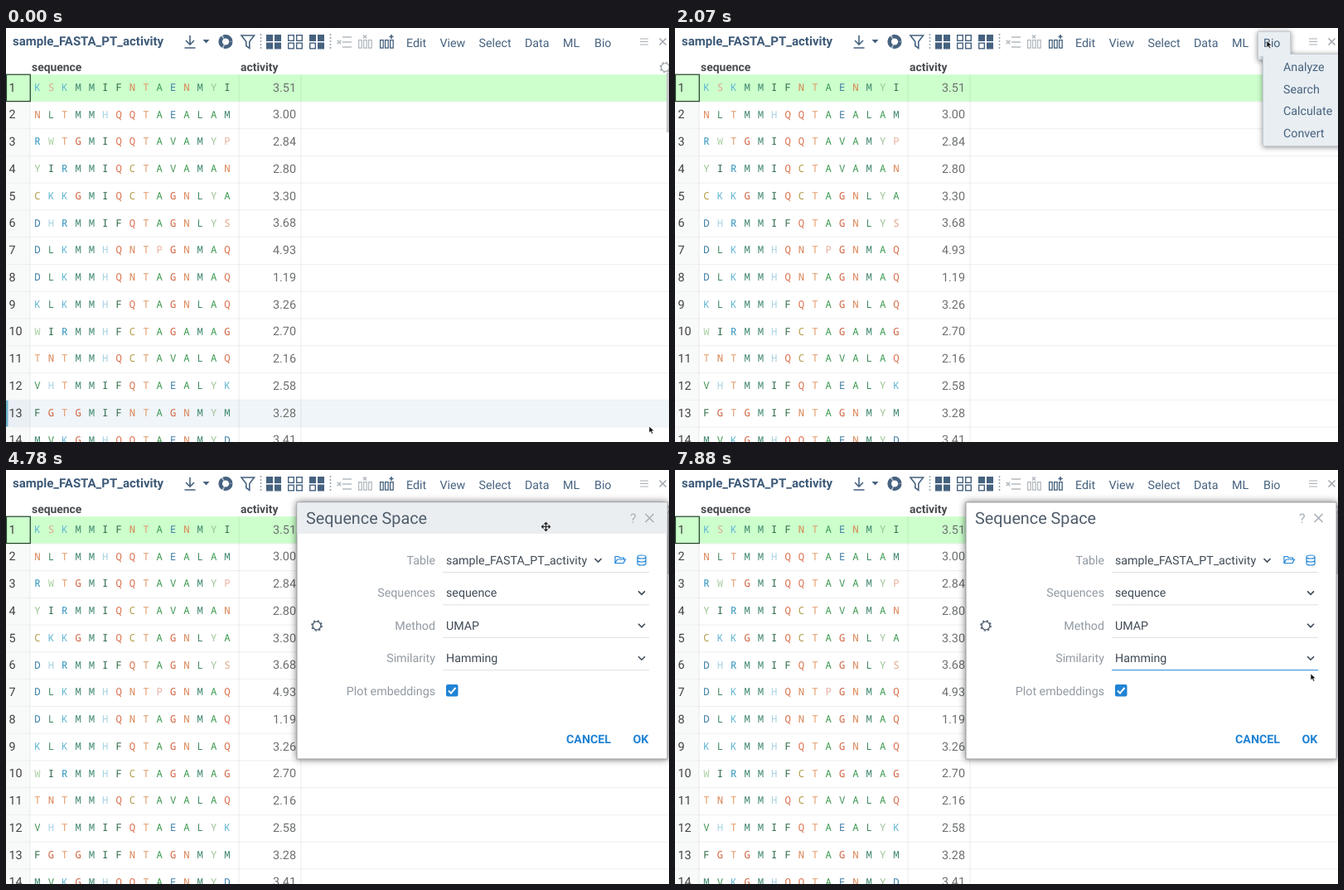
These frames come from a looping animation (800x500 px, 8 s). An HTML page:

```html
<!DOCTYPE html>
<html lang="en">
<head>
<meta charset="utf-8">
<title>Sequence table</title>
<style>
html, body { margin: 0; width: 100%; height: 100%; overflow: hidden; background: #fff; }
svg { display: block; font-family: Roboto, sans-serif; font-size: 14.25px; text-rendering: geometricPrecision; }
.mono { font-family: "Noto Sans Mono", "DejaVu Sans Mono", monospace; font-size: 12.3px; font-weight: 500; text-anchor: middle; }
.bold { font-weight: 700; }
.end { text-anchor: end; }
.line { fill: none; stroke-width: 1.6; }
.shadow { filter: drop-shadow(0 1px 3px rgba(0, 0, 0, .45)); }
</style>
</head>
<body>
<svg id="stage" width="800" height="500" viewBox="0 0 800 500"></svg>
<script>
const NAVY = '#46627f', GREY = '#b4bac0', BLUE = '#2083d5';
const TOP = 56.2, ROW = 32.75;

const rows = `KSKMMIFNTAENMYI 3.51
NLTMMHQQTAEALAM 3.00
RWTGMIQQTAVAMYP 2.84
YIRMMIQCTAVAMAN 2.80
CKKGMIQCTAGNLYA 3.30
DHRMMIFQTAGNLYS 3.68
DLKMMHQNTPGNMAQ 4.93
DLKMMHQNTAGNMAQ 1.19
KLKMMHFQTAGNLAQ 3.26
WIRMMHFCTAGAMAG 2.70
TNTMMHQCTAVALAQ 2.16
VHTMMIFQTAEALYK 2.58
FGTGMIFNTAGNMYM 3.28
MVKGMHQQTAENMYD 3.41`.split('\n').map(r => r.split(' '));

const residue = {
  K: '#62b6d4', S: '#e0a68a', M: '#438a70', I: '#286646', F: '#2f6b45', N: '#d9804f', T: '#e59a68',
  A: '#3c9a50', E: '#3f7da5', Y: '#98c190', L: '#418a63', H: '#a9d2e2', Q: '#d96f4c', R: '#2b90bb',
  W: '#a9cfa0', G: '#cf6340', V: '#429557', C: '#b09a45', D: '#397ca5', P: '#e8ae9e'
};

// Text is placed by the vertical middle of its capitals.
const text = (x, y, s, fill = NAVY, cls = '', size = 14.25) =>
  `<text x="${x}" y="${y + size * .355}" fill="${fill}" class="${cls}" style="font-size:${size}px">${s}</text>`;
const rect = (x, y, w, h, fill, more = '') =>
  `<rect x="${x}" y="${y}" width="${w}" height="${h}" fill="${fill}" ${more}/>`;
const path = (d, stroke = NAVY, more = '') => `<path class="line" d="${d}" stroke="${stroke}" ${more}/>`;
const group = (id, body, more = '') => `<g id="${id}" ${more}>${body}</g>`;
const cross = (x, y, r, c) => path(`M${x - r} ${y - r}l${2 * r} ${2 * r}m0 ${-2 * r}l${-2 * r} ${2 * r}`, c);
const gear = (x, y, c) => `<g class="line" stroke="${c}"><circle cx="${x}" cy="${y}" r="4.9" style="stroke-width:1.4"/>
  <circle cx="${x}" cy="${y}" r="6.1" stroke-dasharray="2.2 2.59"/></g>`;
const chevron = (x, y) => path(`M${x - 4} ${y - 2}l4 4 4-4`, '#3d4a58');

function grid() {
  let s = rect(0, TOP, 29, 450, '#f8f9f9') + group('hover',
    rect(0, 0, 800, ROW, '#f0f5f9') + rect(0, 0, 29, ROW, '#e9eff4') + rect(0, 0, 2.5, ROW, '#6db3cc'));
  s += rect(0, TOP, 800, ROW, '#ccffcc');
  rows.forEach(([seq, value], i) => {
    const y = 71.5 + i * ROW;
    s += rect(0, TOP + (i + 1) * ROW - .5, 800, 1, '#efefef');
    s += text(3.5, y, i + 1, '#424242', '', 14.4);
    s += [...seq].map((c, k) => text(38 + k * 16.36, y, c, residue[c], 'mono', 12.3)).join('');
    s += text(350, y, value, '#6c706e', 'end', 14.4);
  });
  for (const x of [29, 281, 356]) s += rect(x - .5, TOP, 1, 450, 'rgba(0,0,0,.08)');
  s += rect(.5, TOP, 28.8, ROW - .4, 'none', 'stroke="#24402a" stroke-width="1.2"');
  s += text(31, 47.5, 'sequence', '#484b4f', 'bold', 13.9) + text(283, 47.5, 'activity', '#484b4f', 'bold', 13.9);
  return s + gear(795.5, 47.5, '#a3aab0') + rect(797, 54, 3, 72, '#c6c8ca');
}

function tiles(x, filled) {
  return [0, 1, 2, 3].map(i => rect(x + i % 2 * 10 + .7, 8.7 + (i >> 1) * 9.5, 6.6, 6.6,
    filled[i] === '1' ? NAVY : '#fff', `stroke="${NAVY}" stroke-width="1.4"`)).join('');
}

function toolbar() {
  const bars = (x, c) => [0, 6, 12].map(d => rect(x + d + .6, 14.6, 3.6, 9.5, 'none', `stroke="${c}" stroke-width="1.3"`)).join('');
  let s = text(8, 16, 'sample_FASTA_PT_activity', '#3d5a78', 'bold', 15);
  s += path('M222 9v11m-5-5l5 5 5-5M215.5 24h13') + `<path d="M237.5 14h8l-4 4.6z" fill="${NAVY}"/>`;
  s += `<circle cx="265" cy="16.5" r="6.3" fill="none" stroke="#a9b8c6" stroke-width="4.2"/>
    <circle cx="265" cy="16.5" r="6.3" fill="none" stroke="${NAVY}" stroke-width="4.4" stroke-dasharray="11.5 1.7"/>`;
  s += path('M284 9h15.5l-5.7 7.5v8l-4-3v-5z');
  s += tiles(314, '1111') + tiles(340, '0000') + tiles(366, '1101');
  for (const x of [307.5, 391.5]) s += path(`M${x} 7v19`, '#9aa6b1', 'stroke-dasharray="2 2"');
  s += path('M406 11h11M406 17h11M406 23h11', GREY, 'stroke-width="2"') + cross(402, 17, 2.3, GREY);
  s += bars(425, GREY) + cross(433, 10.5, 2, GREY) + bars(451, NAVY) + path('M465 8v5M462.5 10.5h5');
  const menu = { Edit: 483, View: 523.5, Select: 570.5, Data: 626, ML: 672 };
  for (const m in menu) s += text(menu[m], 17.5, m);
  return s + path('M765 13h10M765 16.5h10M765 20h10', '#a9afb5', 'style="stroke-width:1.2"') + cross(792.5, 16.5, 4, '#a3a9af');
}

const panel = (x, y, w, h) => rect(x, y, w, h, '#e9eef2', 'stroke="#c3cdd6" class="shadow"');
const list = (x, names) => names.map((n, i) => text(x, 47 + i * 26.5, n)).join('');

function menus() {
  const bio = panel(703.5, 4.5, 39, 34) + panel(709.5, 31.5, 100, 111) + rect(704, 26, 38.5, 8, '#e9eef2') +
    group('analyze', rect(709, 34, 91, 26.5, '#d5dce3')) + list(734, ['Analyze', 'Search', 'Calculate', 'Convert']);
  const sub = panel(528, 32, 180, 137) + rect(531, 34, 175, 26.5, '#d5dce3', 'id="pick"') +
    list(559, ['SAR...', 'Sequence Space...', 'Activity Cliffs...', 'MSA...', 'Composition']);
  const tip = rect(712.5, 63.5, 100, 133, '#fcfde3', 'rx="2" stroke="#d9dcc0" class="shadow"') +
    ['Creates 2D', 'sequence', 'space with', 'projected', 'sequences by', 'pairwise', 'distance']
      .map((l, i) => text(718, 75 + i * 17.85, l, '#4a4f55', '', 12.9)).join('');
  return group('bio', bio) + group('sub', sub) + group('tip', tip);
}

function dialog() {
  let s = rect(351, 39, 447, 310, '#fff', 'stroke="#9a9ea2" style="filter:drop-shadow(0 0 4px rgba(0,0,0,.55))"');
  s += rect(351.5, 39.5, 446, 37.5, '#ebeef1', 'id="bar"');
  s += text(362, 58, 'Sequence Space', '#4f5d6b', '', 19.8) + text(753, 58, '?', '#a9b0b7', '', 16) + cross(776.5, 58, 5, '#a9b0b7');
  const fields = { Table: 'sample_FASTA_PT_activity', Sequences: 'sequence', Method: 'UMAP', Similarity: 'Hamming', 'Plot embeddings': '' };
  Object.entries(fields).forEach(([label, value], i) => {
    const y = 109 + i * 39.4;
    s += text(518, y, label, '#929aa2', 'end') + text(531, y, value, '#404a55');
    if (value) s += rect(527, y + 14, 249, 1, '#dbe0e4', `id="under${i}"`) + chevron(i ? 767 : 714.5, y);
  });
  s += path('M735 112.5v-8h4l1.5 1.5h5v2M735 112.5l2.5-4.500h10l-2.500 4.500z', BLUE, 'style="stroke-width:1.2"');
  s += path('M762 105v8a5 2 0 0 0 10 0v-8a5 2 0 0 0-10 0a5 2 0 0 0 10 0M762 109a5 2 0 0 0 10 0', BLUE, 'style="stroke-width:1.2"');
  s += gear(375, 188, '#526373') + rect(531, 259, 14.5, 14.5, BLUE, 'rx="2"') + path('M534 266.5l3 3 5.500-6.500', '#fff', 'style="stroke-width:2"');
  return s + text(676, 325, 'CANCEL', BLUE, 'bold') + text(756.5, 325, 'OK', BLUE, 'bold');
}

function choices() {
  const names = ['Hamming', 'Levenshtein', 'Monomer chemical distance', 'Needleman-Wunsch'];
  return rect(506, 236, 272, 90, '#f4f4f4', 'rx="5" stroke="#d0d0d0" class="shadow"') + rect(510, 240, 264, 20.5, '#3f87e5', 'rx="4"') +
    path('M515 250l3 3.500 5-7', '#fff') +
    names.map((n, i) => text(531, 250.5 + i * 20.5, n, i ? '#333' : '#fff', '', 13)).join('');
}

const arrow = `<path d="M0 0v7.800l1.900-1.500 1.400 3 1.500-.700-1.400-2.900 2.500-.300z" fill="#111" stroke="#fff" stroke-width=".6"/>`;
const mover = path('M-5 0h10M0-5v10M-3-2l-2 2 2 2M3-2l2 2-2 2M-2-3l2-2 2 2M-2 3l2 2 2-2', '#222', 'style="stroke-width:1.2"');

stage.innerHTML = grid() + toolbar() + menus() + text(710, 17.5, 'Bio') +
  group('dialog', dialog()) + group('choices', choices()) +
  group('cursor', group('arrow', arrow) + group('mover', mover));

const el = id => document.getElementById(id);
const show = (id, on) => el(id).style.display = on ? '' : 'none';

const linear = p => p, speedUp = p => p ** 1.4, slowDown = p => p * (2 - p), smooth = p => p * p * (3 - 2 * p);
const STEP = 70;
// start, end, x, y, easing
const moves = [
  [70, 840, 754, 254, speedUp],
  [910, 1250, 741, 89.2, linear],
  [1320, 1670, 714, 14, slowDown],
  [2070, 2490, 713, 41, smooth],
  [2950, 3700, 650, 68, smooth],
  [4050, 4170, 652, 69, linear],
  [4780, 4780, 651.5, 68.5, linear],
  [5390, 6120, 766, 231, smooth],
  [6320, 6320, 765.5, 230, linear],
  [7250, 7540, 767, 246, smooth]
];

function pointer(t) {
  let x = 776, y = 481;
  for (const [from, to, tx, ty, ease] of moves) {
    if (t < from) break;
    const p = ease(Math.min(1, (Math.floor((t - from) / STEP) + 1) * STEP / (to - from + STEP)));
    x += (tx - x) * p;
    y += (ty - y) * p;
  }
  return [x, y];
}

function draw(t) {
  const [x, y] = pointer(t);
  const row = Math.floor((y - TOP) / ROW);
  show('hover', t < 1600 && row > 0);
  el('hover').setAttribute('transform', `translate(0 ${TOP + row * ROW})`);

  const open = t >= 1600 && t < 4570, sub = open && t >= 2280;
  show('bio', open);
  show('analyze', sub);
  show('sub', sub);
  show('pick', x < 708);
  el('pick').setAttribute('y', y < 60.5 ? 34 : 60.5);
  show('tip', open && t >= 3600);

  const shown = t >= 4640, dragging = shown && y < 77;
  show('dialog', shown);
  show('bar', dragging);
  el('under3').setAttribute('fill', t >= 6590 ? BLUE : '#dbe0e4');
  show('choices', t >= 6590 && t < 7880);
  el('choices').style.opacity = t < 7740 ? 1 : t < 7810 ? .6 : .3;

  show('arrow', !dragging);
  show('mover', dragging);
  el('cursor').setAttribute('transform', `translate(${x} ${y})`);
}

function tick() {
  draw(performance.now() % 8000);
  requestAnimationFrame(tick);
}
tick();
</script>
</body>
</html>
```
